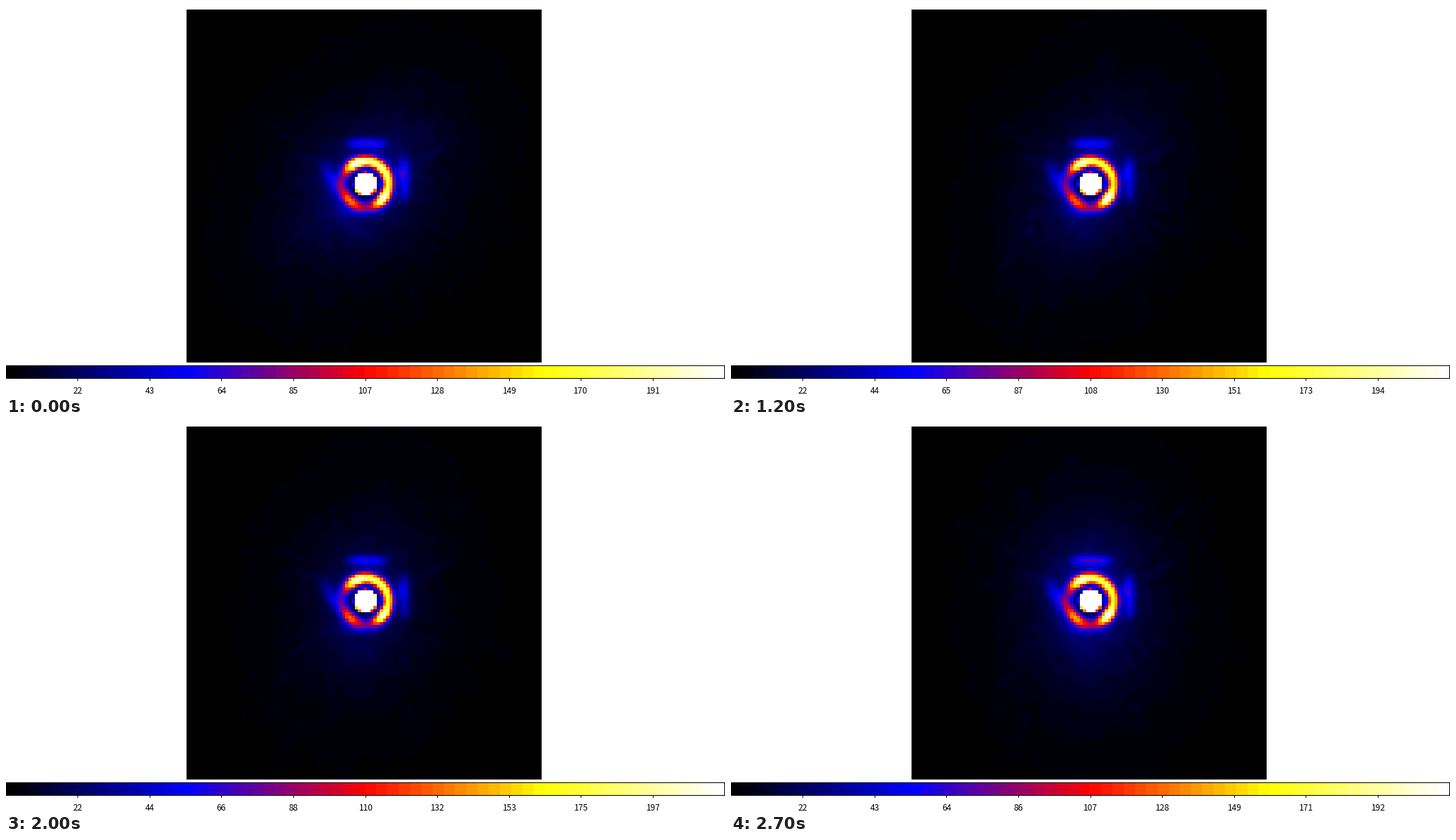
These frames come from a looping animation (1016 px wide and 551 px high, 2.8 s). A matplotlib script:

```python
import numpy as np
import matplotlib.pyplot as plt
from matplotlib.animation import FuncAnimation
from matplotlib.colors import LinearSegmentedColormap
from matplotlib.patches import Rectangle

W, H, DPI = 1016, 551, 128
PX = 72 / DPI
FRAMES, STEP_MS, HOLD = 28, 100, 4
N = 112
LEFT, RIGHT, TOP, BOTTOM = 256, 756, 5, 505
CX, CY = 508, 252

heat = LinearSegmentedColormap.from_list("heat", [
    (0, "#000000"), (.25, "#0000ff"), (.5, "#ff0000"),
    (.75, "#ffff00"), (1, "#ffffff")], N=1024)

# Key points of the brightness scale and of the halo strength.
KEYS = [4, 9, 12, 16, 20, 24, 27]
LABEL_UNIT = [21.19, 20.615, 21.52, 21.878, 21.83, 20.727, 21.26]
HALO = [1.0, .5, .9, .7, .75, 1.0, 1.1]

x, y = np.meshgrid(LEFT + (np.arange(N) + .5) * (RIGHT - LEFT) / N,
                   TOP + (np.arange(N) + .5) * (BOTTOM - TOP) / N)
dx, dy = x - CX, CY - y
r = np.hypot(dx, dy)
theta = np.degrees(np.arctan2(dy, dx))


def spot(px, py, length, tilt, width, power=2):
    """Soft elongated spot; the tilt runs clockwise on screen."""
    c, s = np.cos(np.radians(tilt)), np.sin(np.radians(tilt))
    along = (x - px) * c + (y - py) * s
    across = (y - py) * c - (x - px) * s
    return np.exp(-np.abs(along / length) ** power - (across / width) ** 2)


def arc(angle, width, power=2):
    """Soft bump around one direction, counter-clockwise from the right."""
    gap = (theta - angle + 180) % 360 - 180
    return np.exp(-np.abs(gap / width) ** power)


def radial_streaks(count, seed=8):
    """Faint streaks pointing away from the centre, near the diagonals."""
    rng = np.random.default_rng(seed)
    total = 0
    for k in range(count):
        angle = 45 + 90 * k + rng.normal(0, 14)
        dist = rng.uniform(80, 220)
        px = CX + dist * np.cos(np.radians(angle))
        py = CY + dist * np.sin(np.radians(angle))
        total = total + spot(px, py, rng.uniform(8, 28), angle, 5) * 1.6 / dist
    return total


def smooth_noise(seed, size=1.5):
    field = np.random.default_rng(seed).normal(size=(N, N))
    f = np.fft.fftfreq(N)
    blur = np.exp(-2 * (np.pi * size) ** 2 * (f[:, None] ** 2 + f ** 2))
    field = np.fft.ifft2(np.fft.fft2(field) * blur).real
    return field / field.std()


def halo(tilt):
    """Exponential glow, stretched along the tilt and dimmed in the middle."""
    c, s = np.cos(np.radians(tilt)), np.sin(np.radians(tilt))
    lean = np.hypot((dx * c + dy * s) * .85, (dy * c - dx * s) * 1.2)
    return .22 * np.exp(-lean / 58) * (1 - np.exp(-(r / 34) ** 4))


core = 1.2 / (1 + np.exp(np.clip((r - 16.6) / .8, -40, 40)))
ring_profile = np.exp(-np.abs((r - 32) / 8.5) ** 2.2)
ring_arcs = [.58 * arc(62, 85, 4), .25 * arc(120, 25),
             .70 * arc(318, 28), .36 * arc(228, 30)]
lobes = [spot(509, 195, 28, 0, 8, 4),
         .85 * spot(563, 246, 30, 90, 8, 4) + .4 * spot(557, 237, 9, 90, 6),
         .6 * spot(460, 244, 25, 60, 10) + .3 * spot(466, 256, 14, 90, 8)]
bottom_glow = .10 * spot(500, 291, 26, 0, 8)
streaks = radial_streaks(18)
grain = smooth_noise(3)
envelope = np.exp(-(r / 220) ** 4)


def sky(i):
    step = max(i, HOLD)
    rng = np.random.default_rng(100 + step)
    glow = np.interp(step, KEYS, HALO)
    tilt = np.interp(step, [HOLD, FRAMES - 1], [45, 90])
    rough = .75 * grain + .4 * smooth_noise(step)

    ring = .13 + .08 * glow
    ring = ring + sum(a * rng.uniform(.93, 1.07) for a in ring_arcs)
    side = (.10 + .10 * glow) * sum(a * rng.uniform(.9, 1.1) for a in lobes)
    img = core + ring_profile * ring + side + bottom_glow
    img += glow * halo(tilt) * (1 + .07 * rough)
    img += streaks + .0015 * (1 + rough) * envelope
    return np.round(np.clip(img, 0, 1) * 100) / 100


fig = plt.figure(figsize=(W / DPI, H / DPI), dpi=DPI, facecolor="white")
ax = fig.add_axes([0, 0, 1, 1])
ax.axis("off")


def block(left, top, width, height, color="black"):
    ax.add_patch(Rectangle((left, top), width, height, color=color, lw=0,
                           antialiased=False, zorder=1))


def show(data, left, right, top, bottom):
    return ax.imshow(data, cmap=heat, vmin=0, vmax=1, interpolation="nearest",
                     extent=(left, right, bottom, top), aspect="auto", zorder=2)


block(LEFT - 1, TOP, RIGHT - LEFT + 2, BOTTOM - TOP, "#202020")
picture = show(sky(0), LEFT, RIGHT, TOP, BOTTOM)
block(0, 509, W, 19)
show(np.linspace(0, 1, 64)[None], 0, W - 1, 510, 527)

labels = []
for n in range(1, 10):
    tick = int(n * W / 10)
    block(tick, 528, 1, 3)
    labels.append(ax.text(tick + .5, 549, "", ha="center", va="baseline",
                          color="black", fontsize=12 * PX,
                          family=["Noto Sans CJK JP", "DejaVu Sans"]))
ax.set_xlim(0, W)
ax.set_ylim(H, 0)


def update(i):
    picture.set_data(sky(i))
    unit = np.interp(i, KEYS, LABEL_UNIT)
    for n, label in enumerate(labels, 1):
        label.set_text(str(int(np.ceil(n * unit + .12))))
    return [picture, *labels]


anim = FuncAnimation(fig, update, frames=FRAMES, interval=STEP_MS,
                     repeat=True, repeat_delay=0, blit=False)
plt.show()
```
